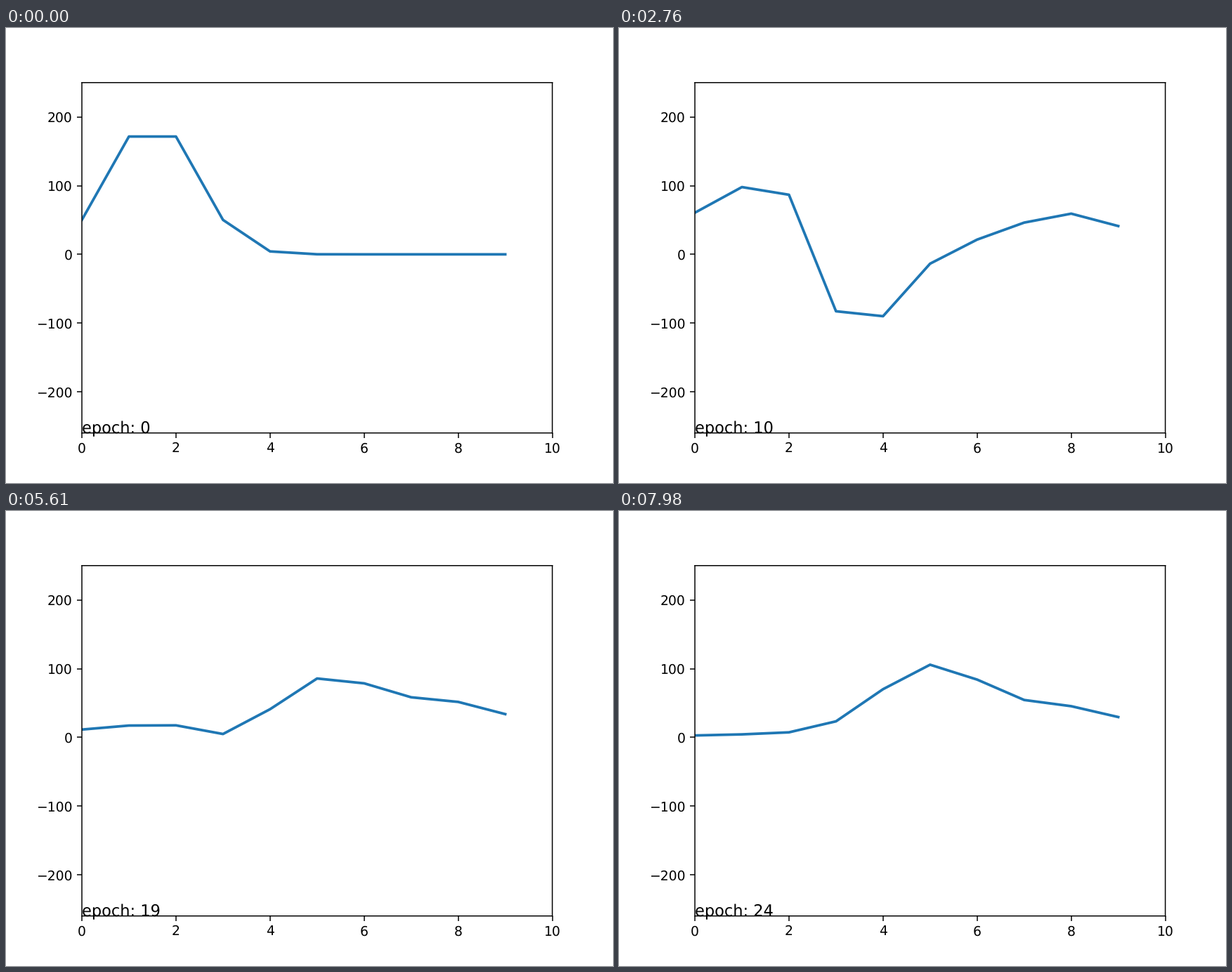
A matplotlib script that plays this animation: 864x648 px, repeating every 8 s.

```python
import numpy as np
import matplotlib.pyplot as plt
from matplotlib.animation import FuncAnimation

plt.rcParams["text.hinting"] = "none"

LOOP, INTERVAL, STEP = 8000, 20, 30  # ms; the curve advances once per STEP
X = np.arange(10)

# Strength of each part of the curve, and the epoch count, at a few moments
TIMES = [0, 1620, 2760, 4380, 5610, 7050, 7980]
HUMP = [200, 157, 104, 35, 17.5, 7.7, 4.3]
DIP = [0, 150, 160, 53, 24, 8, 2]
TAIL = [0, 12, 59, 51, 48, 40, 42]
PEAK = [0, 0, 3, 64, 85, 102, 102]
EPOCH = [0, 5.5, 10.5, 16.5, 19.5, 22.5, 24.5]


def at(t, keys):
    return np.interp(t, TIMES, keys)


def bump(center, left, right):
    """Bell with its own falloff on each side."""
    d = X - center
    return np.exp(-np.where(d < 0, left, right) * d * d)


def curve(t):
    spread = 0.2 + 0.415 * np.exp(-t / 1180)  # the first hump widens
    center = np.interp(t, [4400, 6000], [5.4, 5])  # the last peak drifts left
    return (at(t, HUMP) * bump(1.5, spread, spread)
            - at(t, DIP) * bump(3.25, 1.7, 0.58)
            + at(t, TAIL) * bump(8, 0.27, 0.36)
            + at(t, PEAK) * bump(center, 0.38, 0.38))


fig, ax = plt.subplots(figsize=(6.4, 4.8), dpi=135)
ax.set_xlim(0, 10)
ax.set_ylim(-260, 250)
ax.tick_params(axis="y", pad=3.8)
for spine in ax.spines.values():
    spine.set_snap(False)
line, = ax.plot(X, curve(0), lw=2)
label = ax.text(0, -260, "epoch: 0", fontsize=12)


def update(frame):
    t = frame * INTERVAL // STEP * STEP
    line.set_ydata(curve(t))
    label.set_text(f"epoch: {int(at(t, EPOCH))}")
    return line, label


anim = FuncAnimation(fig, update, frames=LOOP // INTERVAL, interval=INTERVAL,
                     init_func=lambda: update(0), repeat=True, repeat_delay=0)
plt.show()
```
